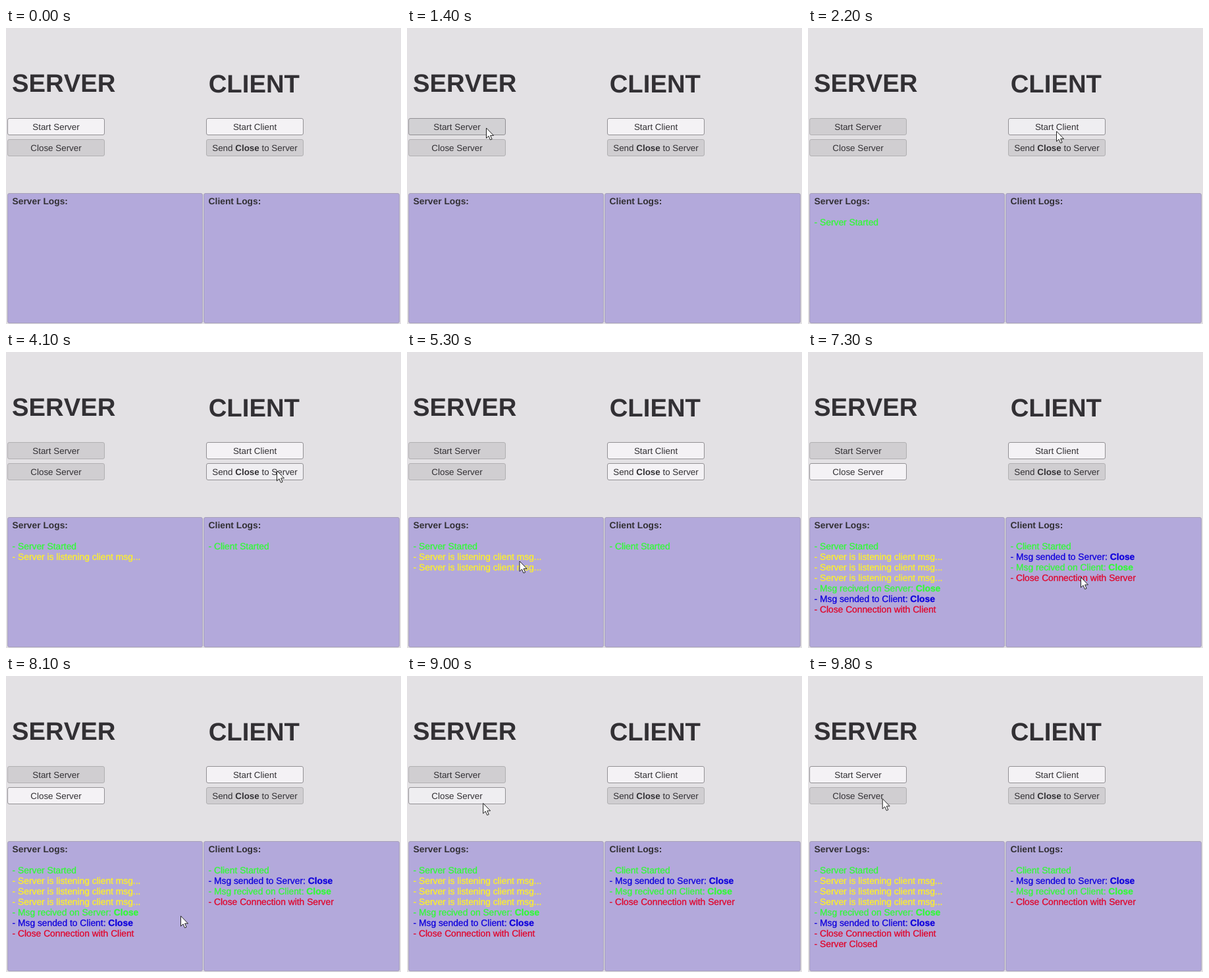
An HTML page that plays this animation: 600 px wide and 450 px high, repeating every 10000 ms.

```html
<!DOCTYPE html>
<html lang="en">
<head>
<meta charset="utf-8">
<title>Server and client</title>
<style>
html, body { margin: 0; width: 100%; height: 100%; overflow: hidden; background: #e3e1e4; }
svg { display: block; }
text { font: 13.8px "Liberation Sans", Arial, sans-serif; font-kerning: none; text-rendering: geometricPrecision; fill: #323034; }
.title { font-size: 38.3px; font-weight: bold; }
.label { font-size: 13.4px; text-anchor: middle; }
.line { stroke-width: .3px; }
.bold { font-weight: bold; }
</style>
</head>
<body>
<svg id="stage" width="600" height="450" viewBox="0 0 600 450"></svg>
<script>
const LOOP = 10000, STEP = 100;
const SERVER_UP = 1500, CLIENT_UP = 3300, LISTEN = 1900, SENT = 6600, REPLY = 7000, DOWN = 9500;
const GREEN = '#33fa38', YELLOW = '#fdf02a', BLUE = '#1000dc', RED = '#e0062c';
const stage = document.getElementById('stage');

function add(tag, attrs, html = '') {
  const el = document.createElementNS('http://www.w3.org/2000/svg', tag);
  for (const k in attrs) el.setAttribute(k, attrs[k]);
  el.innerHTML = html;
  return stage.appendChild(el);
}
const bold = s => `<tspan class="bold">${s}</tspan>`;
const box = (x, y, width, height, fill, stroke) =>
  add('rect', { x: x + .5, y: y + .5, width: width - 1, height: height - 1, rx: 2.5, fill, stroke });
const show = (el, on) => el.setAttribute('visibility', on ? 'visible' : 'hidden');

// A button knows when it is enabled and the moment it is clicked.
function button(x, y, label, click, enabled) {
  const w = 148, h = 26, rect = box(x, y, w, h);
  add('text', { class: 'label', x: x + w / 2, y: y + 17.8 }, label);
  return (t, [px, py]) => {
    const on = enabled(t);
    const hover = px > x && px < x + w && py > y && py < y + h;
    rect.setAttribute('fill', !on ? '#d0ced1' : t === click ? '#d2d1d4' : hover ? '#efeef1' : '#f4f2f5');
    rect.setAttribute('stroke', on ? '#929094' : '#b1b0b2');
  };
}

function panel(x, width, title, lines) {
  const left = x + 7.6;
  box(x, 251, width, 198, '#b3a9db', '#a7a1ba');
  add('text', { class: 'bold', x: left, y: 268.1 }, title);
  return lines.map(([time, color, line], i) => {
    const style = `fill:${color};stroke:${color}`;
    const el = add('text', { class: 'line', x: left, y: 300.3 + 15.92 * i, style }, '- ' + line);
    return t => show(el, t >= time);
  });
}

add('text', { class: 'title', x: 8.9, y: 97.3 }, 'SERVER');
add('text', { class: 'title', x: 307.7, y: 98.3 }, 'CLIENT');

const buttons = [
  button(2, 137, 'Start Server', SERVER_UP - STEP, t => t < SERVER_UP || t >= DOWN),
  button(2, 169, 'Close Server', DOWN - STEP, t => t > REPLY && t < DOWN),
  button(304, 137, 'Start Client', CLIENT_UP - STEP, () => true),
  button(304, 169, `Send ${bold('Close')} to Server`, SENT - STEP, t => t > CLIENT_UP && t < SENT)
];

const listening = [0, 1, 2].map(i =>
  [Math.min(CLIENT_UP + STEP + i * LISTEN, REPLY), YELLOW, 'Server is listening client msg...']);

const logs = [
  ...panel(2, 297, 'Server Logs:', [
    [SERVER_UP, GREEN, 'Server Started'],
    ...listening,
    [REPLY, GREEN, 'Msg recived on Server: ' + bold('Close')],
    [REPLY, BLUE, 'Msg sended to Client: ' + bold('Close')],
    [REPLY + STEP, RED, 'Close Connection with Client'],
    [DOWN, RED, 'Server Closed']
  ]),
  ...panel(300, 298, 'Client Logs:', [
    [CLIENT_UP, GREEN, 'Client Started'],
    [SENT, BLUE, 'Msg sended to Server: ' + bold('Close')],
    [REPLY, GREEN, 'Msg recived on Client: ' + bold('Close')],
    [REPLY + STEP, RED, 'Close Connection with Server']
  ])
];

const cursor = add('path', {
  d: 'M0 0V15.5L3.5 12.2L6 18L8.6 17L6.1 11.4H11Z',
  fill: '#fff', stroke: '#222', 'stroke-linejoin': 'round'
});

// Pointer moves: start, end, x, y
const ENTER = 200;
const moves = [
  [ENTER, 800, 120.5, 152], [1900, 2200, 377.5, 157], [3500, 4100, 411.5, 180.5],
  [4100, 4700, 171, 318], [5400, 6000, 385.5, 189.5], [6900, 7300, 414.5, 342.5],
  [7300, 7800, 382, 345], [7900, 8400, 200, 376], [8400, 9000, 115.7, 193.5],
  [9100, 9300, 113.2, 186.5]
];
const easeOut = k => 1 - (1 - k) ** 2;

function pointerAt(t) {
  let x = 242, y = 62;
  for (const [from, to, tx, ty] of moves) {
    const k = easeOut(Math.min(Math.max((t - from) / (to - from), 0), 1));
    x += (tx - x) * k;
    y += (ty - y) * k;
  }
  return [x, y];
}

function draw(now) {
  const t = Math.floor(now % LOOP / STEP) * STEP;
  const pointer = pointerAt(t);
  for (const update of buttons) update(t, pointer);
  for (const update of logs) update(t);
  show(cursor, t >= ENTER);
  cursor.setAttribute('transform', `translate(${pointer})`);
}

const start = performance.now();
function tick() {
  draw(performance.now() - start);
  requestAnimationFrame(tick);
}
tick();
</script>
</body>
</html>
```
